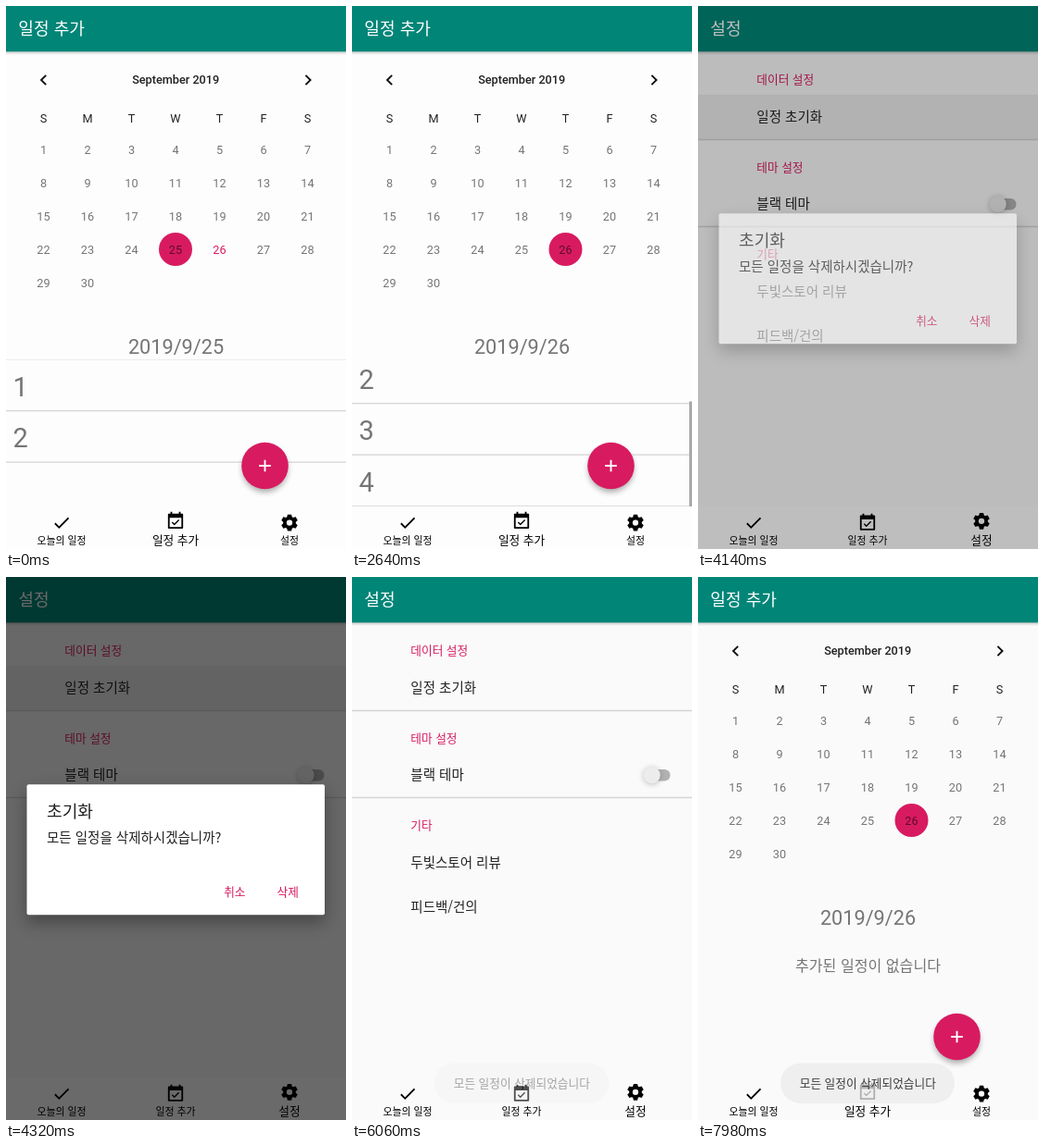
Write an HTML page that moves like this. It is 367x587 px and loops after 8000 ms.

```html
<!DOCTYPE html>
<html lang="ko">
<head>
<meta charset="utf-8">
<title>일정 추가</title>
<style>
  html, body { margin: 0; width: 100%; height: 100%; overflow: hidden; background: #fafafa; }
  svg { display: block; width: 367px; height: 587px; }
  text { font-family: "Noto Sans CJK KR", "Noto Sans KR", sans-serif; fill: #212121; }
  .num { font-family: Roboto, sans-serif; }
  .mid { text-anchor: middle; }
  .pink { fill: #d81b60; }
  .grey { fill: #757575; }
  .rule { stroke: #d4d4d4; stroke-width: 1.3; }
</style>
</head>
<body>
<svg id="stage" viewBox="0 0 367 587">
  <defs>
    <clipPath id="listClip"><rect y="382" width="367" height="159"/></clipPath>
    <clipPath id="rowClip"><rect y="96" width="367" height="48"/></clipPath>
    <filter id="soft" x="-30%" y="-30%" width="160%" height="170%"><feGaussianBlur stdDeviation="3"/></filter>
    <filter id="wide" x="-20%" y="-30%" width="140%" height="170%"><feGaussianBlur stdDeviation="9"/></filter>
    <linearGradient id="edge" x2="0" y2="1">
      <stop stop-color="#000" stop-opacity=".2"/><stop offset="1" stop-color="#000" stop-opacity="0"/>
    </linearGradient>
  </defs>

  <g id="settings">
    <rect width="367" height="587" fill="#fafafa"/>
    <circle id="ripple" cx="177" cy="120" clip-path="url(#rowClip)"/>
    <path class="rule" d="M0 144.5H367M0 238.5H367"/>
    <g id="prefs"></g>
    <rect x="317" y="208" width="26.5" height="12.5" rx="6.2" fill="#b2b2b2"/>
    <circle cx="323.7" cy="215.2" r="9" opacity=".25" filter="url(#soft)"/>
    <circle cx="323.7" cy="214.2" r="9" fill="#ececec"/>
  </g>

  <g id="planner">
    <rect id="paper" width="367" height="587"/>
    <g fill="none" stroke="#111" stroke-width="1.9">
      <path d="M43.2 74.8L38 80L43.2 85.2M323.4 74.8L328.6 80L323.4 85.2"/>
    </g>
    <circle id="pick" cy="263" r="18" fill="#d81b60"/>
    <g id="month"></g>
    <text id="date" class="num mid grey" x="183.5" y="376" font-size="21.7"></text>
    <text id="empty" class="mid grey" x="183.5" y="426" font-size="16.1">추가된 일정이 없습니다</text>
    <g clip-path="url(#listClip)">
      <g id="list"><path class="rule" d="M0 382H367" style="stroke-width:.8"/></g>
      <ellipse id="glowTop" cx="200" cy="382" rx="230"/>
      <ellipse id="glowEnd" cx="184" cy="541" rx="230"/>
      <rect id="bar" x="364" width="3" height="113.5" fill="#a9a9a9"/>
    </g>
    <circle cx="279.5" cy="501" r="24.5" opacity=".32" filter="url(#soft)"/>
    <circle cx="279.5" cy="497" r="25.3" fill="#d81b60"/>
    <path d="M273.2 497h12.6M279.5 490.7v12.6" stroke="#fff" stroke-width="1.9"/>
  </g>

  <rect y="49" width="367" height="4" fill="url(#edge)"/>
  <rect width="367" height="49.3" fill="#008577"/>
  <text id="title" x="13.3" y="30.9" font-size="18.1" style="fill:#fff"></text>

  <rect id="navBack" y="541" width="367" height="46"/>
  <g id="nav"></g>

  <rect id="dim" width="367" height="587"/>
  <g id="dialog">
    <rect x="22.5" y="232" width="321.5" height="141" opacity=".35" filter="url(#wide)"/>
    <rect x="22.5" y="224.3" width="321.5" height="141" rx="2" fill="#fff"/>
    <text x="44" y="259.6" font-size="18.1">초기화</text>
    <text x="44" y="287.2" font-size="14.5">모든 일정을 삭제하시겠습니까?</text>
    <rect id="press" x="280" y="324.5" width="48" height="32" rx="2"/>
    <text class="pink" x="235.2" y="344.9" font-size="12.7">취소</text>
    <text class="pink" x="292.6" y="344.9" font-size="12.7">삭제</text>
  </g>

  <g id="toast">
    <rect x="89" y="525.5" width="188" height="43.5" rx="21.7" fill="#ededed" opacity=".74"/>
    <text class="mid" x="183.3" y="551.8" font-size="12.7" fill-opacity=".87">모든 일정이 삭제되었습니다</text>
  </g>
</svg>

<script>
const LOOP = 8000, STEP = 60, ROW = 55.6;
const $ = id => document.getElementById(id);
const set = (el, attrs) => { for (const k in attrs) el.setAttribute(k, attrs[k]); };

function add(parent, tag, attrs, label) {
  const el = document.createElementNS('http://www.w3.org/2000/svg', tag);
  set(el, attrs);
  if (label !== undefined) el.textContent = label;
  parent.appendChild(el);
  return el;
}

// Piecewise linear value from [time, value] pairs.
function track(t, ...keys) {
  if (t <= keys[0][0]) return keys[0][1];
  for (let i = 1; i < keys.length; i++) {
    const [a, u] = keys[i - 1], [b, v] = keys[i];
    if (t < b) return u + (v - u) * (t - a) / (b - a);
  }
  return keys[keys.length - 1][1];
}

// Month grid
const colX = i => 40.5 + 47.5 * i;
const days = [];
add($('month'), 'text', { class: 'num mid', x: 183.2, y: 84.4, 'font-size': 12.7, 'font-weight': 500 }, 'September 2019');
[...'SMTWTFS'].forEach((d, i) =>
  add($('month'), 'text', { class: 'num mid', x: colX(i), y: 125.8, 'font-size': 12.7 }, d));
for (let d = 1; d <= 30; d++) {
  days[d] = add($('month'), 'text', {
    class: 'num mid grey', x: colX((d - 1) % 7), 'font-size': 12.7,
    y: 160 + 35.9 * Math.floor((d - 1) / 7)
  }, d);
}

// Numbered list
const rows = [1, 2, 3, 4].map(n => {
  const g = add($('list'), 'g', { transform: `translate(0 ${382 + ROW * (n - 1)})` });
  add(g, 'text', { class: 'num grey', x: 7.6, y: 39.8, 'font-size': 29 }, n);
  add(g, 'path', { class: 'rule', d: `M0 ${ROW}H367` });
  return g;
});

// Settings entries: label, baseline, heading
[['데이터 설정', 84.4, 1], ['일정 초기화', 125.2], ['테마 설정', 178.6, 1], ['블랙 테마', 219.4],
 ['기타', 272.6, 1], ['두빛스토어 리뷰', 314], ['피드백/건의', 362]].forEach(([s, y, head]) =>
  add($('prefs'), 'text', { x: 63.3, y, class: head ? 'pink' : '', 'font-size': head ? 12.7 : 14.5 }, s));

// Bottom tabs
const tabs = ['오늘의 일정', '일정 추가', '설정'].map((s, i) => ({
  icon: add($('nav'), 'g', {}),
  label: add($('nav'), 'text', { class: 'mid', x: 60 + 123 * i, y: 581.5, style: 'fill:#000' }, s),
  x: 60 + 123 * i
}));
add(tabs[0].icon, 'path', { d: 'M-3 4.17L-7.17 0l-1.42 1.41L-3 7 9-5 7.59-6.41z' });
add(tabs[1].icon, 'path', {
  d: 'M-8-8H8V8H-8z', fill: 'none', stroke: '#000', 'stroke-width': 2, 'stroke-linejoin': 'round'
});
add(tabs[1].icon, 'path', { d: 'M-8-8H8v4H-8zM-6-11h2v3h-2zM4-11h2v3h-2z' });
add(tabs[1].icon, 'path', { d: 'M-4.1 1.3L-1.4 4 4-1.4', fill: 'none', stroke: '#000', 'stroke-width': 1.5 });
add(tabs[2].icon, 'circle', { r: 5.5, fill: 'none', stroke: '#000', 'stroke-width': 4 });
for (let a = 0; a < 360; a += 60)
  add(tabs[2].icon, 'path', { d: 'M-3.2-6L-2.3-9.8H2.3L3.2-6z', transform: `rotate(${a})` });

function render(now) {
  const t = Math.floor(now % LOOP / STEP) * STEP;
  const inSettings = t >= 2760 && t < 6780;
  const cleared = t >= 6000;

  // Screens
  $('planner').setAttribute('opacity', t < 5000
    ? track(t, [2700, 1], [2760, .4], [2820, .15], [2940, 0])
    : track(t, [6720, 0], [6780, .6], [6840, .9], [6900, 1]));
  $('paper').setAttribute('fill', cleared ? '#fafafa' : '#fdfdfd');
  $('navBack').setAttribute('fill', cleared ? '#fafafa' : '#fdfdfd');
  $('title').textContent = inSettings ? '설정' : '일정 추가';

  // Chosen day
  const day = t < 1260 || (t >= 7440 && t < 7740) ? 25 : 26;
  $('pick').setAttribute('cx', colX(day - 22));
  [25, 26].forEach(d => {
    days[d].style.fill = d === day ? 'rgba(0,0,0,.56)' : d === 26 ? '#d81b60' : '#757575';
  });
  $('date').textContent = '2019/9/' + day;

  // List
  const k = track(t, [1800, 0], [2340, 1]);
  const scroll = 63.6 * k * k * (3 - 2 * k);
  set($('list'), { transform: `translate(0 ${-scroll})`, visibility: cleared ? 'hidden' : 'visible' });
  rows.forEach((r, i) => r.setAttribute('visibility', cleared || (i > 1 && day === 25) ? 'hidden' : 'visible'));
  $('empty').setAttribute('visibility', cleared ? 'visible' : 'hidden');
  set($('bar'), { y: 382 + scroll * .715, opacity: t >= 1860 && t < 5000 ? 1 : 0 });
  const pull = track(t, [660, 0], [780, 1], [960, 0]);
  const hit = track(t, [2220, 0], [2340, 1], [2460, 0]);
  set($('glowTop'), { ry: 20 * pull, opacity: .05 * pull });
  set($('glowEnd'), { ry: 20 * (pull + hit), opacity: .05 * (pull + hit) });

  // Tabs
  const grow = track(t, [2700, 0], [2820, 1], [6720, 1], [6840, 0]);
  tabs.forEach(({ icon, label, x }, i) => {
    const on = [0, 1 - grow, grow][i];
    icon.setAttribute('transform', `translate(${x} ${558.6 - 1.8 * on}) scale(.906)`);
    label.setAttribute('font-size', 10.9 + 1.8 * on);
  });

  // Row ripple, dialog, toast
  set($('ripple'), {
    r: track(t, [4020, 112], [4140, 260]),
    opacity: t < 4020 || t >= 5880 ? 0 : .05
  });
  $('dim').setAttribute('opacity', track(t, [4020, 0], [4260, .5], [4320, .58], [5820, .58], [5880, .5], [5940, .375], [6000, .16], [6060, 0]));
  $('dialog').setAttribute('opacity', track(t, [4020, 0], [4140, .6], [4260, 1], [5820, 1], [5880, .75], [5940, .28], [6000, 0]));
  $('press').setAttribute('opacity', track(t, [5220, 0], [5400, .1]));
  $('toast').setAttribute('opacity', track(t, [5940, 0], [6000, .2], [6060, .45], [6240, .85], [6480, 1]));
}

const start = performance.now();
(function frame() {
  render(performance.now() - start);
  requestAnimationFrame(frame);
})();
</script>
</body>
</html>
```
